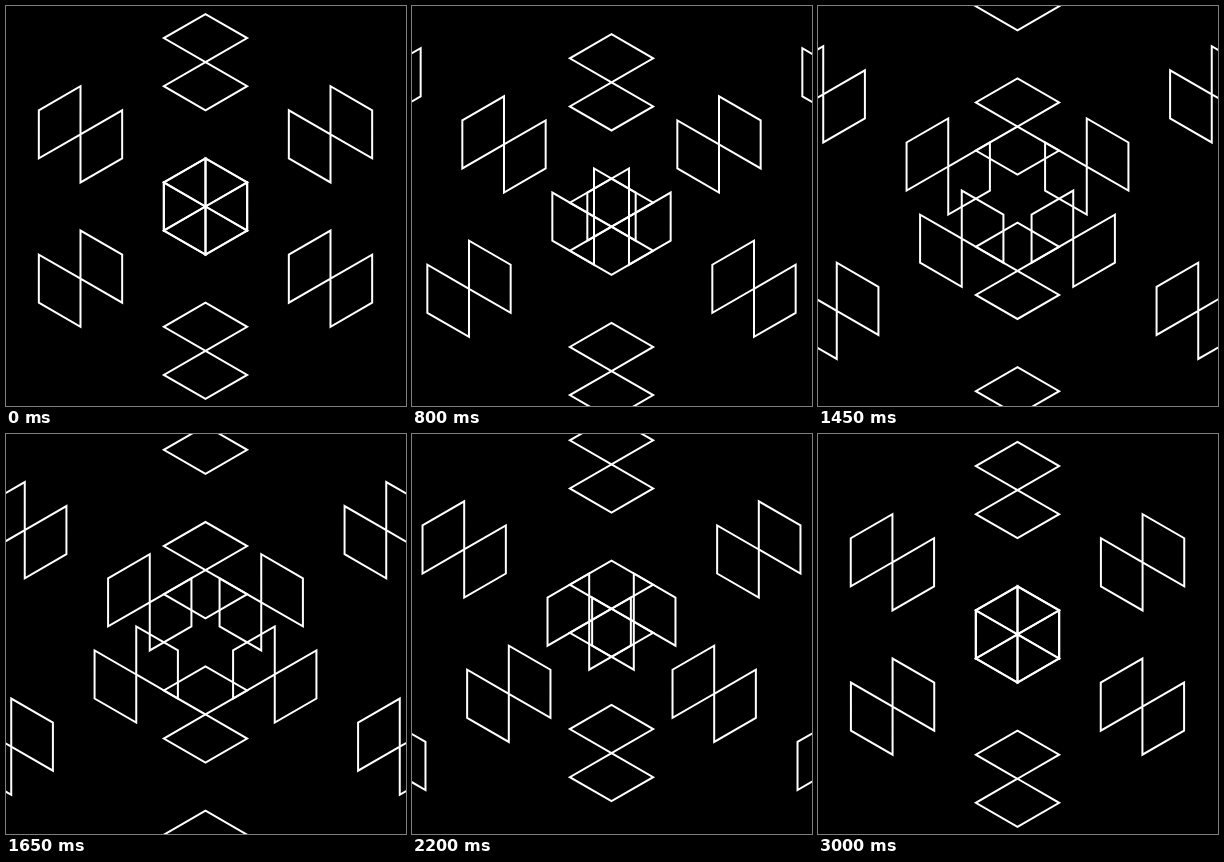
Write an HTML page that moves like this. It is 400 px wide and 400 px high and loops after 3.05 s.

```html
<!DOCTYPE html>
<html lang="en">
<head>
<meta charset="utf-8">
<title>Sliding rhombi</title>
<style>
  html, body { margin: 0; width: 100%; height: 100%; overflow: hidden; background: #000; }
  svg { display: block; width: 100%; height: 100%; }
</style>
</head>
<body>
<svg viewBox="0 0 400 400">
  <defs>
    <path id="pair" d="M0 0L41.667 -24.056L0 -48.113L-41.667 -24.056ZM0 0L41.667 24.056L0 48.113L-41.667 24.056Z"/>
    <g id="column">
      <use href="#pair" y="-433.01"/>
      <use href="#pair" y="-288.675"/>
      <use href="#pair" y="-144.338"/>
      <use href="#pair"/>
      <use href="#pair" y="144.338"/>
      <use href="#pair" y="288.675"/>
    </g>
  </defs>
  <g transform="translate(199.5 200.5)" fill="none" stroke="#fff" stroke-width="2">
    <use class="slide" href="#column"/>
    <g transform="rotate(-60)"><use class="slide" href="#column"/></g>
    <g transform="rotate(60)"><use class="slide" href="#column"/></g>
  </g>
</svg>
<script>
  const STEP = 50, STEPS = 60, LOOP = 3050, SPACING = 144.338;
  const slides = document.querySelectorAll('.slide');

  // Symmetric cubic-bezier(h, 0, 1 - h, 1), solved by bisection.
  function ease(p, h = 0.385) {
    let lo = 0, hi = 1, s = 0.5;
    for (let i = 0; i < 24; i++) {
      s = (lo + hi) / 2;
      const x = 3 * h * s * (1 - s) ** 2 + 3 * (1 - h) * s * s * (1 - s) + s ** 3;
      if (x < p) lo = s; else hi = s;
    }
    return s * s * (3 - 2 * s);
  }

  const start = performance.now();

  function draw(now) {
    const t = Math.max(0, now - start) % LOOP;
    // The rest pose is held for two steps.
    const step = Math.max(0, Math.floor(t / STEP) - 1);
    const y = SPACING * ease(step / STEPS);
    for (const el of slides) el.setAttribute('transform', `translate(0 ${y.toFixed(3)})`);
    requestAnimationFrame(draw);
  }
  draw(start);
</script>
</body>
</html>
```
